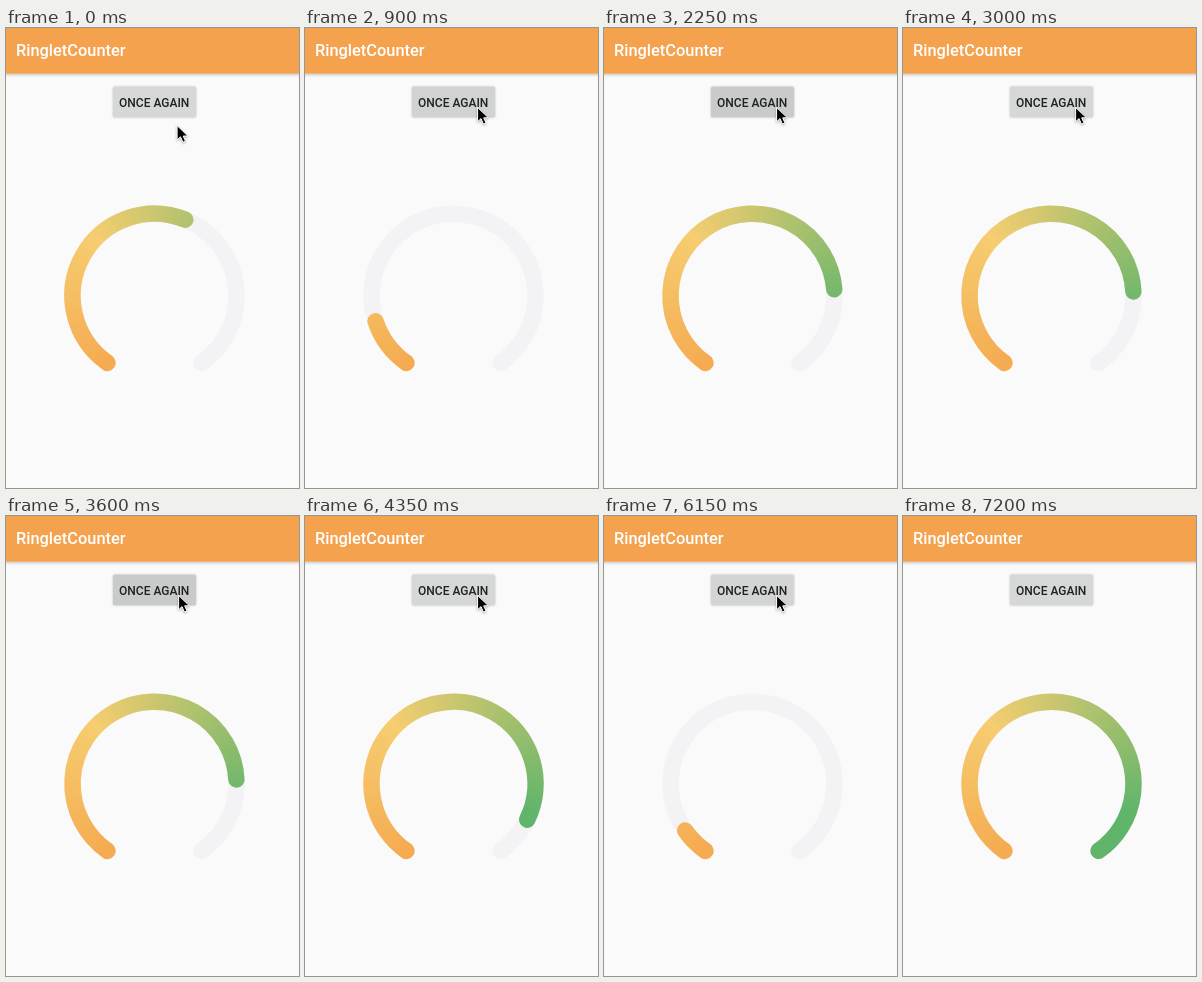
An HTML page for the animation above (7670 ms loop, 293 by 460 pixels).

```html
<!DOCTYPE html>
<html lang="en">
<head>
<meta charset="utf-8">
<title>Ring progress</title>
<style>
html, body { margin: 0; width: 100%; height: 100%; overflow: hidden; background: #fafafa; }
svg { display: block; width: 100%; height: 100%; }
text { font-family: Roboto, sans-serif; font-weight: 500; }
#button { filter: drop-shadow(0 .8px .8px rgba(0, 0, 0, .24)); }
#cursor { filter: drop-shadow(0 1px .8px rgba(0, 0, 0, .3)); }
</style>
</head>
<body>
<svg viewBox="0 0 293 460">
  <defs>
    <linearGradient id="shade" x2="0" y2="1">
      <stop offset="0" stop-color="#000" stop-opacity=".2"/>
      <stop offset=".4" stop-color="#000" stop-opacity=".08"/>
      <stop offset="1" stop-color="#000" stop-opacity="0"/>
    </linearGradient>
    <mask id="reveal" maskUnits="userSpaceOnUse" x="0" y="0" width="293" height="460">
      <path id="arc" fill="none" stroke="#fff" stroke-width="16.5" stroke-linecap="round"/>
    </mask>
  </defs>
  <rect width="293" height="460" fill="#fafafa"/>
  <rect y="45.7" width="293" height="4" fill="url(#shade)"/>
  <rect width="293" height="45.7" fill="#f4a24e"/>
  <text x="10" y="28.3" font-size="16.4" fill="#fff">RingletCounter</text>
  <rect id="button" x="107" y="58.8" width="83" height="30.5" rx="1.6"/>
  <text x="148.2" y="79.1" font-size="12" fill="#212121" text-anchor="middle">ONCE AGAIN</text>
  <path id="track" fill="none" stroke="#f3f3f5" stroke-width="16.5" stroke-linecap="round"/>
  <g id="ring" mask="url(#reveal)" fill="none" stroke-width="19"/>
  <path id="cursor" d="M.6 .6V15L4 11.8L6.4 17.3L9 16.2L6.7 11H11.4Z" fill="#000" stroke="#fff"/>
</svg>
<script>
const LOOP = 7670, STEP = 150, LAST = 7200;
const CX = 148.5, CY = 267.7, R = 82, FROM = -145, SWEEP = 290;
const ORANGE = [245, 171, 81], YELLOW = [246, 205, 112], GREEN = [96, 181, 107];
const GREY = [214, 215, 215], DARK = [201, 203, 202];

const $ = id => document.getElementById(id);
const clamp = k => Math.max(0, Math.min(1, k));
const mix = (a, b, k) => a + (b - a) * clamp(k);
const blend = (a, b, k) => `rgb(${a.map((v, i) => Math.round(mix(v, b[i], k)))})`;
const easeOut = (k, power = 2) => 1 - (1 - clamp(k)) ** power;

// Angles are clockwise degrees from the top
function point(deg) {
  const a = deg * Math.PI / 180;
  return `${(CX + R * Math.sin(a)).toFixed(2)} ${(CY - R * Math.cos(a)).toFixed(2)}`;
}
const arcPath = (a, b) => `M${point(a)}A${R} ${R} 0 ${b - a > 180 ? 1 : 0} 1 ${point(b)}`;

// Sweep gradient: orange to yellow to green
const colorAt = deg => deg < -45
  ? blend(ORANGE, YELLOW, (deg - FROM) / 100)
  : blend(YELLOW, GREEN, (deg + 45) / 155);

for (let a = -155; a < 155; a += 2.5) {
  const seg = document.createElementNS('http://www.w3.org/2000/svg', 'path');
  seg.setAttribute('d', arcPath(a, a + 3.5));
  seg.setAttribute('stroke', colorAt(a + 1.25));
  $('ring').append(seg);
}
$('track').setAttribute('d', arcPath(FROM, FROM + SWEEP));

// The button is held for a moment, then the ring refills to its share
const RUNS = [
  { start: -800, span: 1000, share: .6 },
  { start: 800, span: 1785, share: .8, power: 3 },
  { start: 2384, span: 600, share: .8, hold: 440 },
  { start: 3742, span: 600, share: .9, hold: 440 },
  { start: 4557, span: 1000, share: 1 },
  { start: 6111, span: 1100, share: 1 }
];

function sweepAt(t) {
  const { start, span, share, power } = RUNS.findLast(r => r.start <= t);
  return SWEEP * share * easeOut((t - start) / span, power);
}

// Darkens for 300 ms after each press, then fades
function pressAt(t) {
  return Math.max(...RUNS.map(({ start, hold = 20 }) => {
    const d = t - start + hold;
    return clamp(Math.min(d / 300, 1 - (d - 300) / 450));
  }));
}

function cursorAt(t) {
  const enter = easeOut(t / 600), leave = clamp((t - 6450) / 600);
  return [mix(170.5, 172, enter) - 22 * leave, mix(97, 78.8, enter) + 386 * leave];
}

function draw(time) {
  const t = Math.min(LAST, Math.floor((time % LOOP) / STEP) * STEP);
  $('arc').setAttribute('d', arcPath(FROM, FROM + sweepAt(t)));
  $('button').setAttribute('fill', blend(GREY, DARK, pressAt(t)));
  $('cursor').setAttribute('transform', `translate(${cursorAt(t)})`);
}

const begin = performance.now();
function tick() {
  draw(performance.now() - begin);
  requestAnimationFrame(tick);
}
tick();
</script>
</body>
</html>
```
